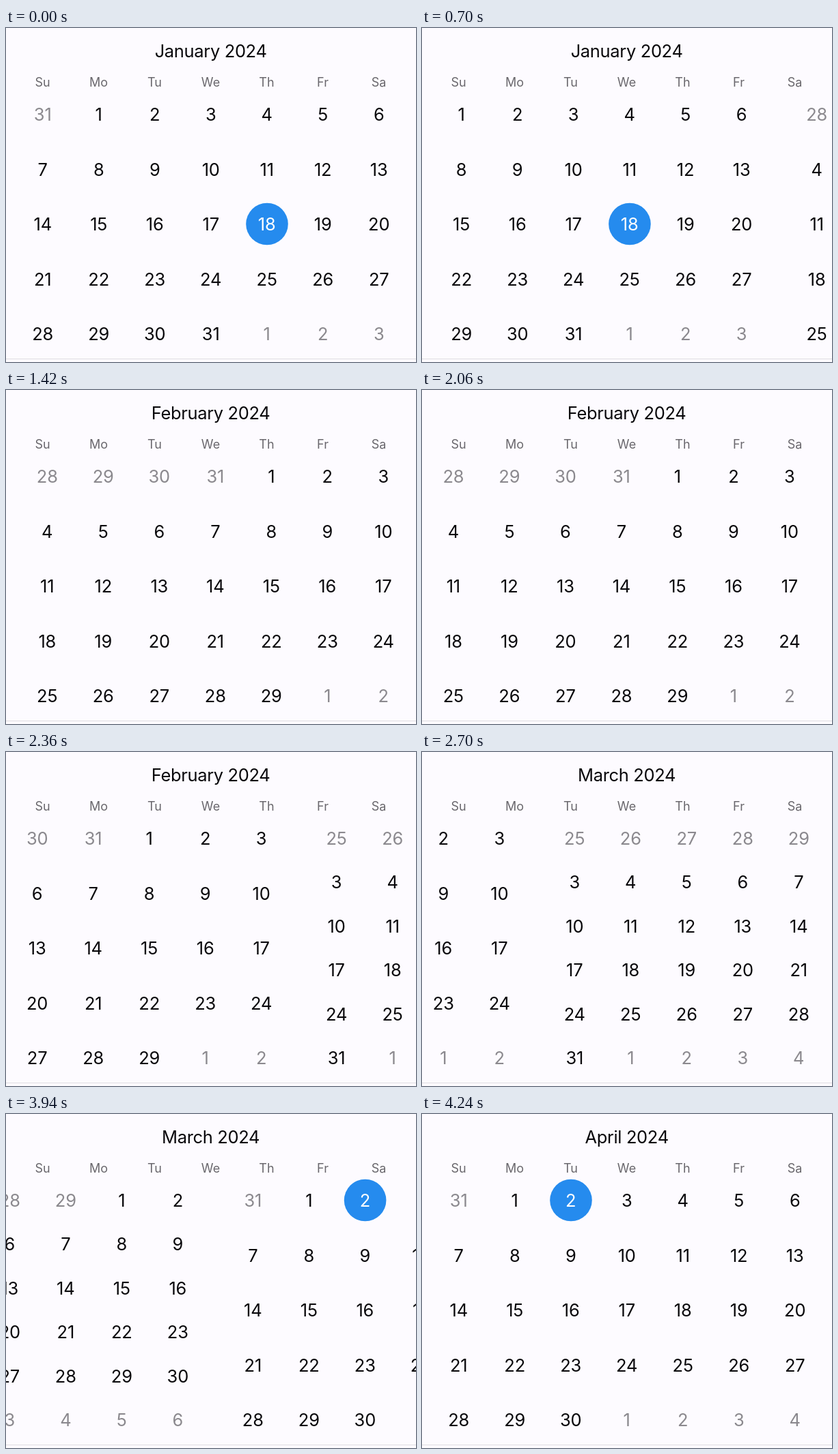
These frames come from a looping animation (600x490 px, 4.67 s). An HTML page:

```html
<!DOCTYPE html>
<html lang="en">
<head>
<meta charset="utf-8">
<title>Swiping calendar</title>
<style>
  html, body { margin: 0; width: 100%; height: 100%; overflow: hidden; background: #fdfbff; }
  svg { display: block; }
  text { font: 400 25.5px Inter, sans-serif; text-anchor: middle; letter-spacing: -.2px; fill: #09080b; }
  .title { letter-spacing: -.35px; }
  .weekday { font-size: 18px; letter-spacing: 0; fill: #69676c; }
  .outside { fill: #8b898e; }
  .selected { fill: #fff; }
  circle { fill: #258bee; }
</style>
</head>
<body>
<svg id="stage" width="600" height="490" viewBox="0 0 600 490"></svg>
<script>
const LOOP = 4670, PAGE = 602, YEAR = 2024;
const MONTHS = ['January', 'February', 'March', 'April'];
const SELECTED = { 0: 18, 3: 2 };
// Each swipe: a finger drag up to the release point, then a settle onto the next page
const SWIPES = [
  { start: 520, release: 1090, end: 1520, dragged: 409.5, drag: 1.445, settle: 2.3 },
  { start: 2030, release: 2700, end: 3030, dragged: 431.5, drag: 1.304, settle: 1.8 },
  { start: 3700, release: 4000, end: 4240, dragged: 400, drag: 1.4, settle: 2.2 },
];

const stage = document.getElementById('stage');

function add(parent, tag, attrs, content = '') {
  const node = document.createElementNS('http://www.w3.org/2000/svg', tag);
  for (const name in attrs) node.setAttribute(name, attrs[name]);
  node.textContent = content;
  return parent.appendChild(node);
}

const columnX = column => 53.7 + 82 * column;

function buildMonth(month, parent) {
  const first = new Date(YEAR, month, 1).getDay();
  const days = new Date(YEAR, month + 1, 0).getDate();
  const weeks = Math.ceil((first + days) / 7);
  for (let i = 0; i < weeks * 7; i++) {
    const date = new Date(YEAR, month, 1 - first + i);
    const x = columnX(i % 7);
    const y = 126.5 + Math.floor(i / 7) * 322 / (weeks - 1);
    const inside = date.getMonth() === month;
    const selected = inside && SELECTED[month] === date.getDate();
    if (selected) add(parent, 'circle', { cx: x + .3, cy: y, r: 30.8 });
    add(parent, 'text', {
      x, y: y + 9.5, class: selected ? 'selected' : inside ? '' : 'outside',
    }, date.getDate());
  }
}

const pager = add(stage, 'g', {});
MONTHS.forEach((name, month) =>
  buildMonth(month, add(pager, 'g', { transform: `translate(${month * PAGE})` })));

const title = add(stage, 'text', { x: 299.6, y: 43, class: 'title' });
['Su', 'Mo', 'Tu', 'We', 'Th', 'Fr', 'Sa'].forEach((day, column) =>
  add(stage, 'text', { x: columnX(column) - .2, y: 85.5, class: 'weekday' }, day));
add(stage, 'rect', { y: 485, width: 600, height: 1, fill: '#dfdde1' });

function swipeOffset(t, { start, release, end, dragged, drag, settle }) {
  if (t <= start) return 0;
  if (t >= end) return PAGE;
  if (t < release) return dragged * ((t - start) / (release - start)) ** drag;
  return PAGE - (PAGE - dragged) * ((end - t) / (end - release)) ** settle;
}

function draw() {
  const t = performance.now() % LOOP;
  const offset = SWIPES.reduce((sum, swipe) => sum + swipeOffset(t, swipe), 0);
  pager.setAttribute('transform', `translate(${-offset})`);
  title.textContent = `${MONTHS[Math.round(offset / PAGE)]} ${YEAR}`;
  requestAnimationFrame(draw);
}
draw();
</script>
</body>
</html>
```
